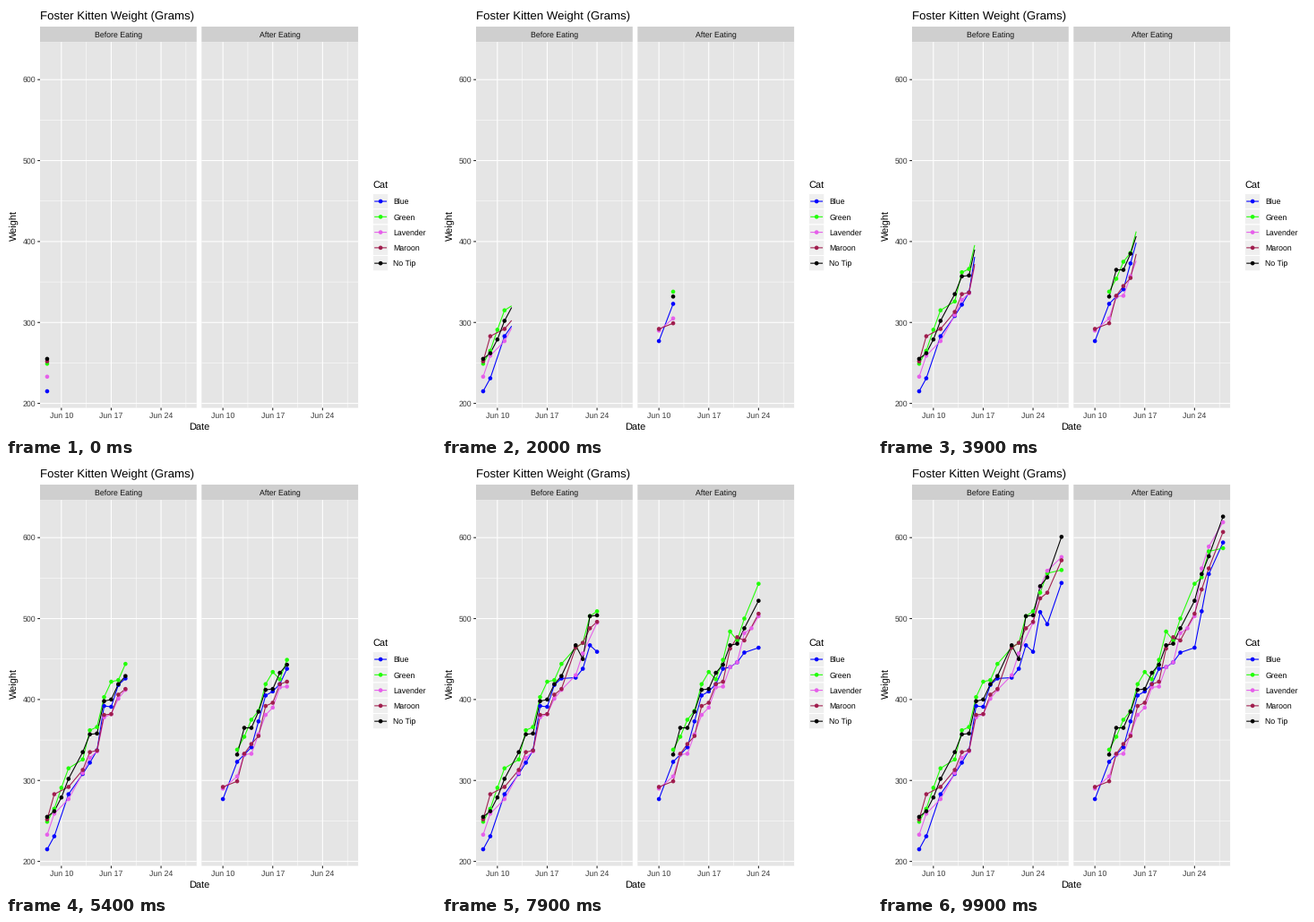
Animation of 480x480 px, one loop 10 s. Source, as a matplotlib script:

```python
import numpy as np
import matplotlib.pyplot as plt
from matplotlib.animation import FuncAnimation
from matplotlib.patches import Rectangle

plt.rcParams["font.family"] = "Liberation Sans"
plt.rcParams["text.hinting"] = "none"

SIZE, DPI, FRAMES, INTERVAL = 480, 72, 100, 100
TOP, BOTTOM, STRIP_TOP, WIDTH = 40.1, 448.6, 23.0, 174.8
PANELS = {"Before Eating": 38.0, "After Eating": 218.3}
DAY = WIDTH / 22
COLORS = {"Blue": "#0000ff", "Green": "#21ff06", "Lavender": "#e65fea",
          "Maroon": "#a01e4e", "No Tip": "#000000"}
X = np.nan

# Weights in grams, one value per weighing day in June
BEFORE_DAYS = [8, 9, 10, 11, 13, 14, 15, 16, 17, 18, 19, 21, 22, 23, 24, 25, 26, 28]
BEFORE = {
    "Blue": [215, 231, X, 283, 308, 322, 337, 392, 391, 418, 426, 427, 438, 467, 459, 508, 493, 544],
    "Green": [249, 265, 291, 315, 326, 362, 366, 403, 422, 424, 444, 464, 470, 503, 509, 532, 556, 560],
    "Lavender": [233, 259, X, 277, 309, 328, 336, 378, 382, 401, 412, 430, 457, X, 495, 539, 559, 576],
    "Maroon": [252, 283, X, 292, 313, 335, 337, 381, 382, 406, 413, 464, 470, 488, 496, 525, 532, 572],
    "No Tip": [255, 262, 279, 302, 335, 357, 358, 398, 400, 419, 429, 467, 450, 503, 504, 540, 551, 601],
}
AFTER_DAYS = [10, 12, 13, 14, 15, 16, 17, 18, 19, 20, 21, 22, 23, 24, 25, 26, 28]
AFTER = {
    "Blue": [277, 323, 332, 341, 373, 405, 410, 419, 438, 440, 446, 458, X, 464, 509, 555, 594],
    "Green": [X, 338, 354, 375, 386, 419, 434, 425, 449, 484, 473, 500, X, 543, 551, 583, 587],
    "Lavender": [290, 305, 332, 333, 357, 381, 390, 415, 416, 440, 446, 482, 488, 503, 562, 589, 619],
    "Maroon": [292, 299, 333, 345, 355, 392, 396, 419, 422, 463, 477, 473, X, 506, 536, 562, 607],
    "No Tip": [X, 332, 365, 365, 385, 412, 413, 433, 443, 467, 469, 488, X, 522, 555, 577, 626],
}

fig = plt.figure(figsize=(SIZE / DPI, SIZE / DPI), dpi=DPI, facecolor="white")
ax = fig.add_axes([0, 0, 1, 1])
ax.set_xlim(0, SIZE)
ax.set_ylim(SIZE, 0)
ax.axis("off")


def day_x(left, day):
    return left + (day - 7) * DAY


def gram_y(grams):
    return 443.6 - (grams - 200) * 0.9035


def rect(x, y, w, h, color, edge="none"):
    ax.add_patch(Rectangle((x, y), w, h, fc=color, ec=edge, lw=1.07, snap=False, zorder=1))


def line(xs, ys, color, width=1.07, z=2):
    return ax.plot(xs, ys, color=color, lw=width, solid_capstyle="butt",
                   snap=False, zorder=z)[0]


def label(x, y, text, size=8.8, color="#3b3b3b", ha="center", **kw):
    ax.text(x, y, text, fontsize=size, color=color, ha=ha, va="baseline", zorder=6, **kw)


def dots(points, colors):
    return ax.scatter(*np.transpose(points), s=4.6 ** 2, c=colors, linewidths=0, zorder=5)


def draw_panel(name, left):
    right = left + WIDTH
    rect(left, STRIP_TOP, WIDTH, TOP - STRIP_TOP, "#cfcfcf")
    rect(left, TOP, WIDTH, BOTTOM - TOP, "#e5e5e5")
    label(left + WIDTH / 2, 35.1, name, color="#101010")
    for grams in range(250, 600, 100):
        line([left, right], [gram_y(grams)] * 2, "white", 0.53)
    for day in (13.5, 20.5, 27.5):
        line([day_x(left, day)] * 2, [TOP, BOTTOM], "white", 0.53)
    for grams in range(200, 601, 100):
        line([left, right], [gram_y(grams)] * 2, "white")
    for day in (10, 17, 24):
        x = day_x(left, day)
        line([x, x], [TOP, BOTTOM], "white")
        line([x, x], [BOTTOM, BOTTOM + 2.75], "#222222")
        label(x, 460.2, f"Jun {day}")


def draw_legend():
    key, left, top = 17.28, 409.5, 209.4
    label(left, 203, "Cat", 11, "black", "left")
    for i in range(len(COLORS)):
        rect(left, top + i * key, key, key, "#efefef", "white")
    centers = [top + (i + 0.5) * key for i in range(len(COLORS))]
    for y, (cat, color) in zip(centers, COLORS.items()):
        line([left + 0.1 * key, left + 0.9 * key], [y, y], color, z=4)
        label(left + key + 5.5, y + 3.2, cat, color="black", ha="left")
    dots([(left + key / 2, y) for y in centers], list(COLORS.values()))


for name, left in PANELS.items():
    draw_panel(name, left)
for grams in range(200, 601, 100):
    y = gram_y(grams)
    line([35.25, 38], [y, y], "#222222")
    label(33, y + 3.2, str(grams), ha="right")
label(38, 15, "Foster Kitten Weight (Grams)", 13.2, "black", "left")
label(215.5, 473, "Date", 11, "black")
label(13, 244.5, "Weight", 11, "black", rotation=90, rotation_mode="anchor")
draw_legend()

# Each series: line artist, colour, reveal steps and pixel positions
series = []
for left, days, table in zip(PANELS.values(), (BEFORE_DAYS, AFTER_DAYS), (BEFORE, AFTER)):
    for cat, color in COLORS.items():
        grams = np.array(table[cat], float)
        known = ~np.isnan(grams)
        day = np.array(days, float)[known]
        steps = np.round((day - 8) * (FRAMES - 1) / 20)
        series.append((line([], [], color, z=3), color, steps,
                       day_x(left, day), gram_y(grams[known])))

points = dots([(s[3][0], s[4][0]) for s in series], [s[1] for s in series])


def update(step):
    places, colors = [], []
    for path, color, steps, xs, ys in series:
        n = int(np.sum(steps <= step))
        px, py = list(xs[:n]), list(ys[:n])
        places += zip(px, py)
        colors += [color] * n
        if 0 < n < len(steps):
            px.append(np.interp(step, steps, xs))
            py.append(np.interp(step, steps, ys))
        path.set_data(px, py)
    points.set_offsets(places)
    points.set_facecolors(colors)
    return [points] + [s[0] for s in series]


anim = FuncAnimation(fig, update, frames=FRAMES, interval=INTERVAL, repeat=True,
                     repeat_delay=0, blit=False)
plt.show()
```
